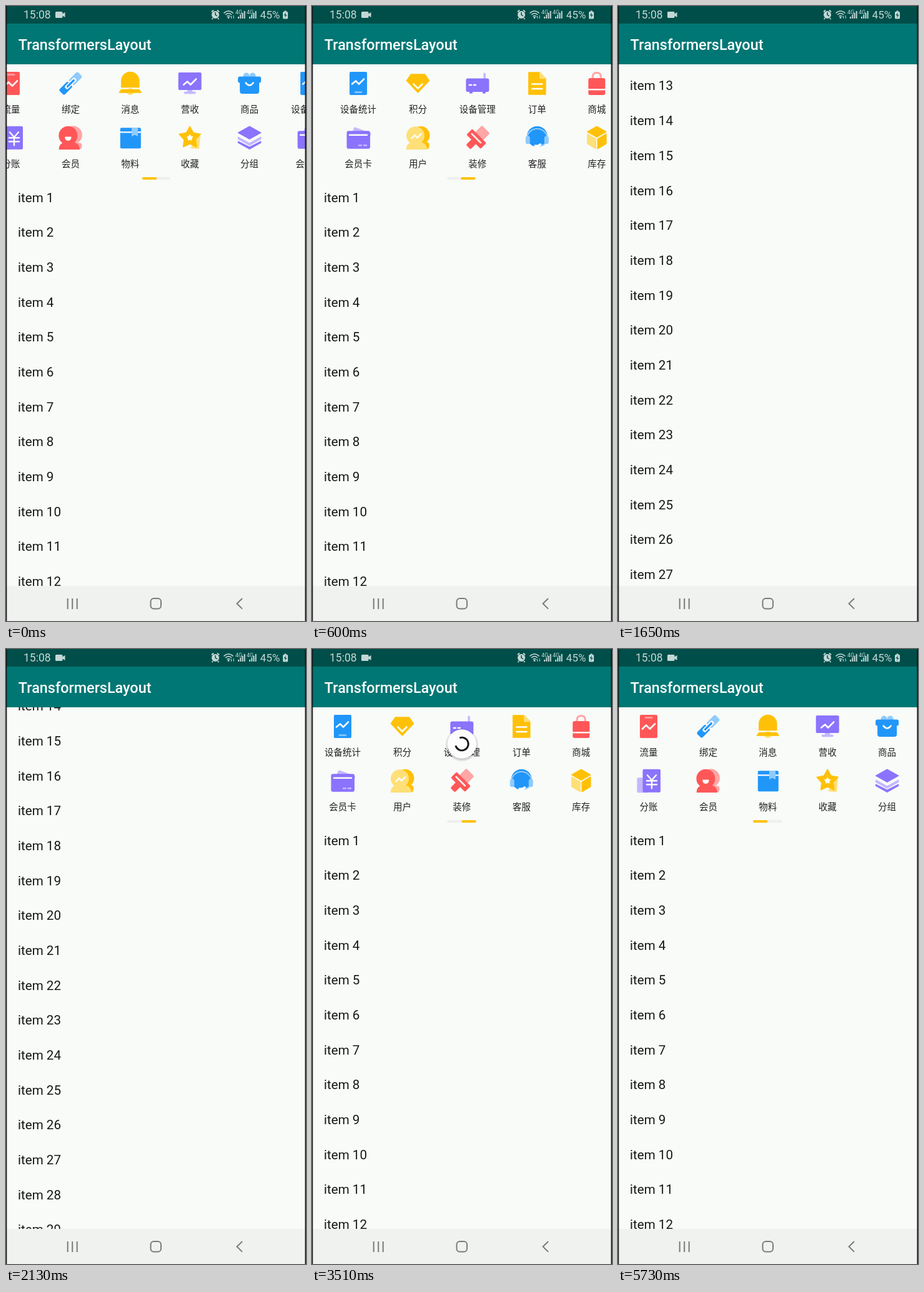
An HTML page that plays this animation: 480 by 981 pixels, repeating every 5760 ms.

```html
<!DOCTYPE html>
<html lang="zh">
<head>
<meta charset="utf-8">
<title>TransformersLayout</title>
<style>
  html, body { margin: 0; height: 100%; overflow: hidden; background: #f8fbf8; }
  svg { display: block; width: 100%; height: 100%; font-family: Roboto, sans-serif; }
  .label { font: 14.5px "Noto Sans CJK SC", "Noto Sans CJK", sans-serif; text-anchor: middle; fill: #222; }
  .item { font-size: 20.6px; fill: #181818; }
  .status { fill: #c3d8d6; }
</style>
</head>
<body>
<svg viewBox="0 0 480 981">
  <defs>
    <radialGradient id="discShade">
      <stop offset=".8" stop-opacity=".24"/><stop offset="1" stop-opacity="0"/>
    </radialGradient>
  </defs>
  <rect width="480" height="981" fill="#f8fbf8"/>
  <g id="list">
    <g id="menu"></g>
    <rect x="216" y="273" width="46.6" height="4" rx="2" fill="#eeefef"/>
    <rect id="thumb" y="273" width="23.3" height="4" rx="2" fill="#ffc107"/>
    <g id="items" class="item"></g>
  </g>
  <g id="spinner">
    <circle cy="1.5" r="27" fill="url(#discShade)"/>
    <circle r="23.2" fill="#fcfdfc"/>
    <circle id="arc" r="10.3" fill="none" stroke="#151515" stroke-width="2.9" pathLength="360"/>
  </g>

  <rect width="480" height="93" fill="#007774"/>
  <rect width="480" height="28" fill="#004e49"/>
  <text x="19.8" y="69.5" font-size="23.4" font-weight="500" fill="#fff">TransformersLayout</text>
  <g class="status">
    <text x="28" y="20.3" font-size="17.5">15:08</text>
    <path d="M80.5 9h8.5q1.5 0 1.5 1.5v2l4-2.5v8l-4-2.5v2q0 1.5-1.5 1.5h-8.5q-1.5 0-1.5-1.5v-7q0-1.5 1.5-1.5z"/>
    <circle cx="335" cy="14" r="6"/>
    <path d="M329 9.5l3-3M341 9.5l-3-3M331 19.5l-1.5 1.5M339 19.5l1.5 1.5" stroke="#c3d8d6" stroke-width="1.8"/>
    <path d="M335 10v4l3 2" fill="none" stroke="#004e49" stroke-width="1.5"/>
    <path d="M348.5 11.500q7.500-7 15 0M351 14q5-4.500 10 0M353.500 16.500q2.500-2 5 0" fill="none" stroke="#c3d8d6" stroke-width="1.5"/>
    <circle cx="356" cy="18.5" r="1.5"/>
    <path d="M360.500 20v-4l-1 1M364 15v4.500l1-1" fill="none" stroke="#c3d8d6"/>
    <g id="signals"></g>
    <text x="406.5" y="20.3" font-size="17.2">45%</text>
    <path d="M444.500 9h1v-1.500h3v1.500h1q1.500 0 1.500 1.500v8.500q0 1.500-1.500 1.500h-5q-1.500 0-1.500-1.500v-8.500q0-1.500 1.500-1.500z"/>
    <path d="M448 10l-3.500 5h2.500l-1 4 3.500-5h-2.500z" fill="#004e49"/>
  </g>

  <rect y="925" width="480" height="56" fill="#f0f2f0"/>
  <g fill="none" stroke="#7a7b7a" stroke-width="2">
    <path d="M98.700 945v17M106.200 945v17M113.700 945v17M378 945l-8.500 8.300 8.500 8.300"/>
    <rect x="231.500" y="945" width="16.500" height="16.500" rx="5"/>
  </g>
  <path d="M.6 0v981M479.2 0v981" stroke="#111" stroke-width="1.5"/>
</svg>
<script>
const LOOP = 5760, STEP = 30, PAGE = 477, COLUMN = PAGE / 5, ROW = 55.67, END = 938;
const RED = '#ff5758', PINK = '#ffa6a6', BLUE = '#2196f9', SKY = '#8fcbfc',
      GOLD = '#ffc107', CREAM = '#ffdf78', VIOLET = '#8b73fd', LILAC = '#c4b8ff', WHITE = '#fcfdfc';
const el = id => document.getElementById(id);

const box = (x, y, w, h, fill, r = 2) =>
  `<rect x="${x}" y="${y}" width="${w}" height="${h}" rx="${r}" fill="${fill}"/>`;
const dot = (x, y, r, fill) => `<circle cx="${x}" cy="${y}" r="${r}" fill="${fill}"/>`;
const shape = (d, fill) =>
  `<path d="${d}z" fill="${fill}" stroke="${fill}" stroke-width="1.5" stroke-linejoin="round"/>`;
const line = (d, color = WHITE, width = 2.6) =>
  `<path d="${d}" fill="none" stroke="${color}" stroke-width="${width}" stroke-linecap="round" stroke-linejoin="round"/>`;
const turn = (deg, body) => `<g transform="rotate(${deg})">${body}</g>`;
const zigzag = 'M-10 4l6-6 6 6 8-8';

function star(radius) {
  return Array.from({ length: 10 }, (_, i) => {
    const r = i % 2 ? radius * .54 : radius, a = i * Math.PI / 5;
    return (i ? 'L' : 'M') + (r * Math.sin(a)).toFixed(1) + ' ' + (-r * Math.cos(a)).toFixed(1);
  }).join('');
}

// Two rows of ten entries: label and icon, drawn around (0, 0).
const rows = [[
  ['流量', box(-14, -18.5, 28, 37, RED) + line('M-5-14h10', PINK) + line(zigzag)],
  ['绑定', turn(-45, box(-21, -6, 20, 12, BLUE, 3) + box(1, -6, 20, 12, SKY, 3) +
    box(-11, -3.2, 22, 6.4, WHITE) + line('M-7 0H7', BLUE, 3.2))],
  ['消息', dot(0, 13, 5.5, CREAM) + shape('M-14 6V-4a14 14 0 0 1 28 0V6', GOLD) +
    shape('M-14 10h28l3.5 4.5h-35', GOLD)],
  ['营收', box(-4, 9, 8, 6, LILAC, 0) + box(-18.5, -17.5, 37, 28, VIOLET) +
    line('M-10 2l6-5 5 5 9-9') + box(-9.5, 13, 19, 3.7, LILAC)],
  ['商品', dot(-5, -12, 5, SKY) + dot(5, -12, 5, SKY) + box(-18.5, -11, 37, 10, BLUE, 3) +
    box(-15.5, -6, 31, 22.5, BLUE, 4) + line('M-6-1q6 8 12 0')],
  ['设备统计', box(-14, -18.5, 28, 37, BLUE) + line('M-5 14h10', SKY) + line('M-10 1l6-5 5 5 8-8')],
  ['积分', shape('M-11-14.5h22l7 10L0 14.5-18-4.5', GOLD) + line('M-7 1l7 7 7-7')],
  ['设备管理', box(9.5, -17, 3.5, 15, LILAC, 1.5) + box(-18.5, -8, 37, 21.5, VIOLET, 3) +
    box(-13, 12, 5, 4, VIOLET, 1) + box(8, 12, 5, 4, VIOLET, 1) + line('M-13 2.5h3M-6 2.5h3')],
  ['订单', shape('M-13.5-17.5H4L13.5-8V17.5h-27', GOLD) + shape('M4.5-17.5v9.5h9', CREAM) +
    line('M-8 1H8M-8 8.5H8')],
  ['商城', line('M-6.5-5v-6q0-6 6.5-6t6.5 6v6', PINK, 3) + box(-13.5, -8.5, 27, 27, RED, 3) +
    box(-13.5, 8.5, 27, 2.5, WHITE, 0)],
], [
  ['分账', box(-18.5, -5, 18, 24, LILAC) + box(-9.5, -18.5, 28.5, 37, VIOLET) +
    line('M-2-9l7 8 7-8M5-1v13M-3 0h16M-3 6h16', WHITE, 2.4)],
  ['会员', dot(4, -4.5, 14.5, PINK) + box(4, 8, 14, 10, PINK, 4) + dot(-4, -3.5, 15, RED) +
    shape('M-18 18q0-8 8-10H6q7 2 8 10', RED) + shape('M-8.5-1h9q-.5 5-4.5 5t-4.5-5', WHITE)],
  ['物料', box(-16, -16, 33, 33, BLUE) + box(-16, -10, 33, 2.2, WHITE, 0) +
    shape('M3-15.5h8.5V-3L7-6 3-3', SKY)],
  ['收藏', shape('M2 16L16-2l-2 19', CREAM) + shape(star(18), GOLD) + shape(star(4.5), WHITE)],
  ['分组', shape('M0-18L18-8 0 2-18-8', VIOLET) + shape('M-18-1L0 9 18-1v3L0 12-18 2', LILAC) +
    shape('M-18 6L0 15 18 6v2L0 18-18 8', VIOLET)],
  ['会员卡', turn(20, box(-12, -14, 29, 20, LILAC)) + box(-18.5, -11, 37.5, 28.5, VIOLET, 3) +
    line('M-14-4.5h28', WHITE, 2.4) + line('M1 12h4M9 12h4', LILAC)],
  ['用户', dot(4.5, -4, 14.5, GOLD) + box(3, 7, 15, 11, GOLD, 4) + dot(-4, -3.5, 14.5, CREAM) +
    shape('M-18 18q0-8 8-10H6q7 2 8 10', CREAM) + line('M-10 1l5-5 4 4 6-6')],
  ['装修', turn(45, box(-9, -19, 18, 17, PINK) + box(-16, -4, 32, 13, RED) + box(-5, 6, 10, 15, RED) +
    line('M-11 2H9'))],
  ['客服', dot(0, -2, 16.5, BLUE) + line('M-16-2a16.5 16.5 0 0 1 32 0', SKY, 2) +
    box(-18.5, -3, 7, 13, SKY, 3.5) + box(11.5, -3, 7, 13, SKY, 3.5) +
    line('M13 8q-2 5-10 5', SKY, 2) + line('M-3 13q5 1 8-2', WHITE, 4)],
  ['库存', shape('M0-18l15 8.5L0-1-15-9.5', GOLD) + shape('M-15-6L-1.5 2v15.5L-15 9.5', CREAM) +
    shape('M15-6L1.5 2v15.5L15 9.5', GOLD)],
]];

el('menu').innerHTML = rows.map((row, r) => row.map(([label, icon], c) => {
  const x = 49 + c * COLUMN, y = 123.5 + r * 86.7;
  return `<g transform="translate(${x} ${y})">${icon}<text class="label" y="46.5">${label}</text></g>`;
}).join('')).join('');

el('items').innerHTML = Array.from({ length: 30 }, (_, i) =>
  `<text x="19" y="${312.7 + i * ROW}">item ${i + 1}</text>`).join('');

el('signals').innerHTML = [367, 385].map(x =>
  `<text x="${x}" y="13" font-size="9">4G</text>` +
  [0, 1, 2, 3].map(i => box(x + 4 + i * 3.2, 17 - i * 3, 2, 3 + i * 3, '#c3d8d6', 0)).join('')).join('');

const clamp = v => Math.min(1, Math.max(0, v));
const progress = (t, from, to) => clamp((t - from) / (to - from));
const fling = (s, power) => 1 - (1 - s) ** power;

function swipe(t) {
  if (t > 4840) return PAGE * (1 - fling(progress(t, 4840, 5640), 2.6));
  return 41 + (PAGE - 41) * fling(progress(t, 0, 900), 2.6);
}

function scroll(t) {
  if (t < 2430) return END * fling(progress(t, 900, 2100), 2.37);
  if (t < 2610) return END - 54 * progress(t, 2430, 2610) ** 2;
  return 884 * (1 - fling(progress(t, 2610, 2990), 1.3));
}

function drawSpinner(t) {
  const pull = fling(progress(t, 3040, 3300), 2);
  const size = 1 - progress(t, 3575, 3730);
  const sweep = 275 * pull;
  const visible = pull > 0 && size > 0;
  el('spinner').setAttribute('display', visible ? 'inline' : 'none');
  el('spinner').setAttribute('transform', `translate(239.8 ${68 + 83.5 * pull}) scale(${size})`);
  el('arc').setAttribute('stroke-dasharray', `${sweep} ${360 - sweep}`);
  el('arc').setAttribute('transform', `rotate(${-110 + (t - 3510) * .35})`);
}

function draw(t) {
  const x = swipe(t);
  el('menu').setAttribute('transform', `translate(${-x} 0)`);
  el('thumb').setAttribute('x', 216 + 23.3 * x / PAGE);
  el('list').setAttribute('transform', `translate(0 ${-scroll(t)})`);
  drawSpinner(t);
}

const start = performance.now();
function tick() {
  const elapsed = performance.now() - start + 3;
  draw(Math.floor(elapsed / STEP) * STEP % LOOP);
  requestAnimationFrame(tick);
}
tick();
</script>
</body>
</html>
```
